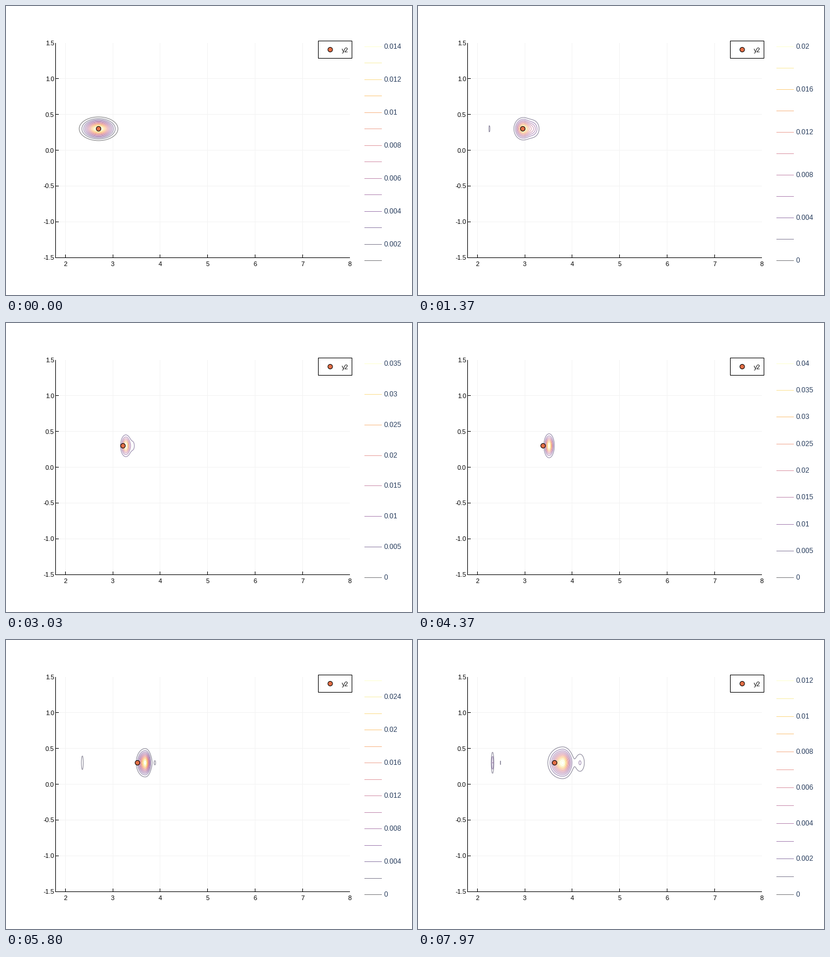
A matplotlib script for the animation above (8000 ms loop, 700x500 px).

```python
import math

import matplotlib.pyplot as plt
import numpy as np
from matplotlib.animation import FuncAnimation
from matplotlib.collections import LineCollection

W, H, DPI = 700, 500, 100
FRAMES, LOOP_MS = 240, 8000
PX = 72 / DPI                      # one pixel in points
INK, LABEL, DOT, GRID = "black", "#2a3f5f", "#e36f47", "#f3f3f3"
plt.rcParams["font.family"] = "Liberation Sans"


def px(x):
    return 86 + 507 * (x - 1.8) / 6.2


def py(y):
    return 435 - 371 * (y + 1.5) / 3


def bell(x, c, s):
    return np.exp(-.5 * ((x - c) / s) ** 2)


KEYS = np.array([0, 41, 91, 131, 174, 239])
I = np.arange(FRAMES)
U = I / (FRAMES - 1)


def track(values):
    """Monotone cubic through the values at KEYS, one sample per frame."""
    v, h = np.array(values), np.diff(KEYS)
    d = np.diff(v) / h
    m = np.r_[d[0], np.zeros(len(v) - 2), d[-1]]
    for k in range(1, len(v) - 1):
        if d[k - 1] * d[k] > 0:
            m[k] = 2 * d[k - 1] * d[k] / (d[k - 1] + d[k])
    k = np.clip(np.searchsorted(KEYS, I, "right") - 1, 0, len(h) - 1)
    s = (I - KEYS[k]) / h[k]
    return ((1 + 2 * s) * (1 - s) ** 2 * v[k] + s * (1 - s) ** 2 * h[k] * m[k]
            + s * s * (3 - 2 * s) * v[k + 1] - s * s * (1 - s) * h[k] * m[k + 1])


dot_x = 2.7 + 1.6075 * U - .611 * U ** 2 - .0684 * U ** 3
peak = track([.0147, .0205, .0365, .042, .02605, .0125])

# lobe ahead of the packet, and a narrow ghost swinging near the left wall
lobe = track([0, .36, .155, 0, .079, .166])
lead = .15 + .215 * ((U - .44) / .56) ** 2
lobe_w = .04 + .042 * ((U - .6) / .42) ** 4
ghost = track([0, .123, .10, .02, .143, .25])
ghost_x = 2.295 + .025 * U - .045 * np.cos(2 * np.pi * (I - 41) / 88)
speck = .083 * bell(I, FRAMES - 1, 6)

# main packet: its width follows from a constant total mass
mid = dot_x + .172 * (1 - np.exp(-(2 * U) ** 3))
tall = .0714 + .0276 * U ** 1.7
width = 1.85e-4 / (peak * tall * (1 + .9 * lobe + .4 * ghost))
skew = .17 * np.clip((I - 131) / 40, 0, 1)

gx = np.arange(1.9, 4.6, .0125)
gy = np.arange(-.05, .66, .0125)
GX, GY = px(gx), py(gy)


def density(i):
    side = np.where(gx < mid[i], 1 + skew[i], 1 - skew[i])
    row = bell(gx, mid[i], width[i] * side)
    row += lobe[i] * bell(gx, mid[i] + lead[i], lobe_w[i])
    row += ghost[i] * bell(gx, ghost_x[i], .018)
    row += speck[i] * bell(gx, 2.489, .014)
    z = np.outer(bell(gy, .3, tall[i]), row)
    return z * peak[i] / z.max()


def nice_step(top):
    rough = top / 17
    base = 10 ** math.floor(math.log10(rough))
    return base * next(m for m in (2, 5, 10) if rough / base <= m)


fig = plt.figure(figsize=(W / DPI, H / DPI), dpi=DPI, facecolor="white")
ax = fig.add_axes([0, 0, 1, 1])
ax.set_xlim(0, W)
ax.set_ylim(H, 0)
ax.autoscale(False)
ax.axis("off")


def line(xs, ys, color=INK, z=2):
    ax.plot(xs, ys, color=color, lw=PX, zorder=z, solid_capstyle="butt", snap=False)


def text(x, y, s, size=11, color=INK, ha="left"):
    return ax.text(x, y, s, fontsize=size * PX, color=color, ha=ha,
                   va="baseline", zorder=6)


def dot(x, y):
    return ax.add_patch(plt.Circle((x, y), 4, fc=DOT, ec=INK, lw=PX, zorder=6))


X0, X1, Y0, Y1 = 85.5, 593, 64, 435.5
for v in range(2, 9):
    x = math.floor(px(v)) + .5
    if v < 8:
        line([x, x], [Y0, Y1], GRID, 1)
        line([x, x], [Y1, Y1 - 5.5])
    text(px(v), 450, str(v), ha="center")
for k in range(-3, 4):
    y = math.floor(py(k / 2)) + .5
    if abs(k) < 3:
        line([X0, X1], [y, y], GRID, 1)
        line([X0, X0 + 5.5], [y, y])
    text(83.3, py(k / 2) + 4, f"{k / 2:.1f}", ha="right")
line([X0, X0], [Y0, Y1 + .5])
line([X0 - .5, X1], [Y1, Y1])

ax.add_patch(plt.Rectangle((538.5, 60.5), 58, 30, fc="white", ec=INK, lw=PX,
                           zorder=5, snap=False))
dot(559, 75.5)
text(579, 80, "y2")

marker = dot(px(dot_x[0]), py(.3))
scale = ax.add_collection(LineCollection([], linewidths=PX, snap=False), autolim=False)
labels = [text(651, 0, "", 12, LABEL) for _ in range(18)]
rings = []


def draw(i):
    while rings:
        rings.pop().remove()
    step = nice_step(peak[i])
    lo, hi = (1 if i == 0 else 0), math.floor(peak[i] / step)
    ks = np.arange(lo, hi + 1)
    colors = plt.cm.inferno((ks - lo) / (hi - lo))
    colors[:, 3] = .5

    shown = ks > 0
    rings.append(ax.contour(GX, GY, density(i), levels=ks[shown] * step,
                            colors=colors[shown], linewidths=PX, zorder=3))
    marker.center = px(dot_x[i]), py(.3)

    rows = np.round(440 - 370 * (ks - lo) / (hi - lo))
    scale.set_segments([[(618, r + .5), (648, r + .5)] for r in rows])
    scale.set_color(colors)
    skip = 2 if (hi - lo) / 8.4 > 1 else 1
    for t in labels:
        t.set_text("")
    for t, k, r in zip(labels, ks, rows):
        if k % skip == 0:
            t.set_text(f"{round(k * step, 6):g}")
            t.set_y(r + 4)
    return []


anim = FuncAnimation(fig, draw, frames=FRAMES, init_func=lambda: draw(0),
                     interval=LOOP_MS / FRAMES, repeat=True, repeat_delay=0)
plt.show()
```
